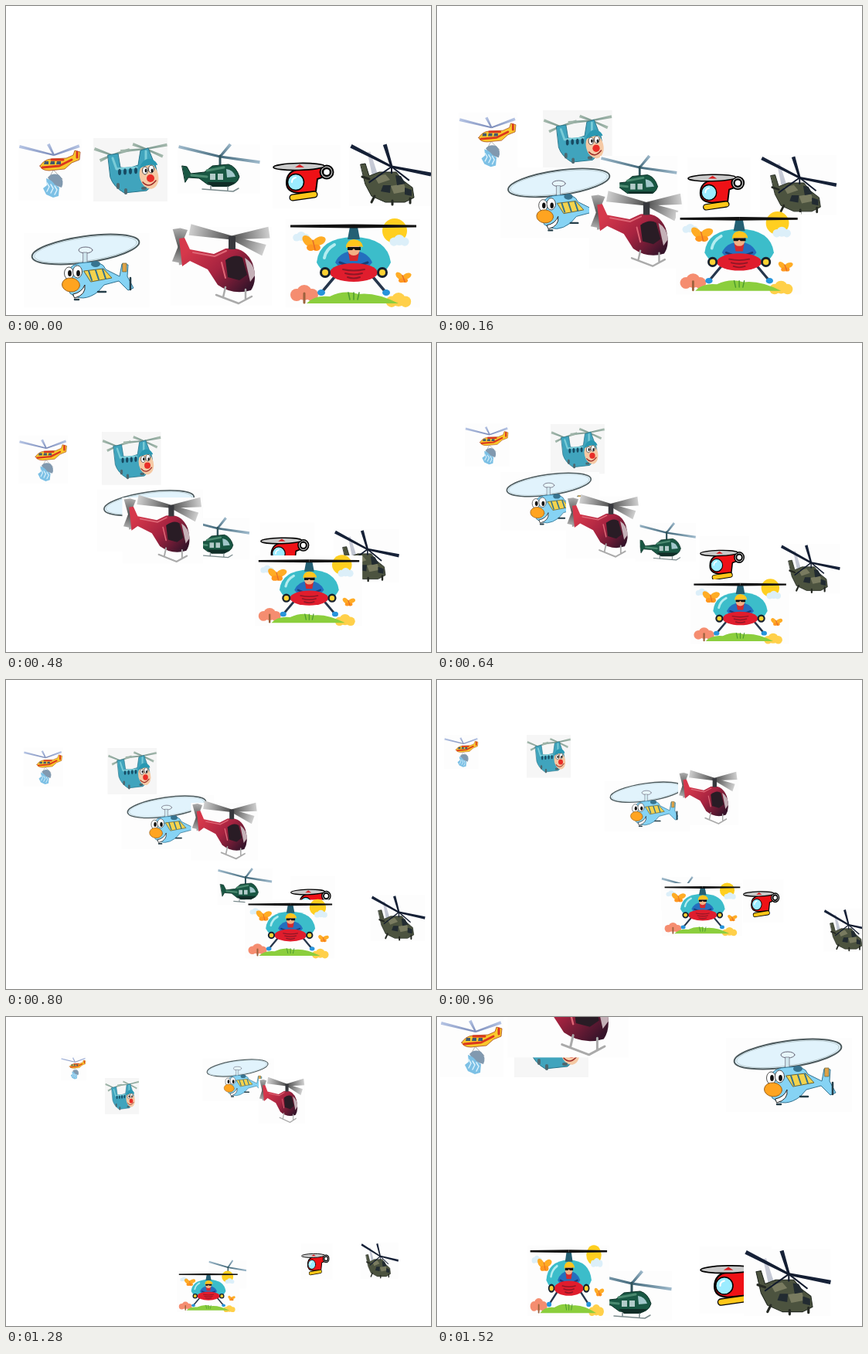
Write an HTML page with a canvas that moves like this. It is 550 px wide and 400 px high and loops after 1600 ms.

```html
<!DOCTYPE html>
<html lang="en">
<head>
<meta charset="utf-8">
<title>Helicopters</title>
<style>
html, body { margin: 0; width: 100%; height: 100%; overflow: hidden; background: #fff }
canvas { display: block }
</style>
</head>
<body>
<canvas id="stage" width="550" height="400"></canvas>
<script>
const ctx = document.getElementById('stage').getContext('2d');
const FRAME = 80, LOOP = 1600, SHRINK_END = 1280;
const times = [0, 160, 320, 640, 960, SHRINK_END, 1520];

function paint(path, fill, stroke, width = 1) {
  if (fill) {
    ctx.fillStyle = fill;
    ctx.fill(path);
  }
  if (stroke) {
    ctx.strokeStyle = stroke;
    ctx.lineWidth = width;
    ctx.stroke(path);
  }
}

const shape = (d, ...style) => paint(new Path2D(d), ...style);
const line = (d, color, width) => shape(d, null, color, width);

function oval(x, y, rx, ry, tilt, ...style) {
  const path = new Path2D();
  path.ellipse(x, y, rx, ry, tilt, 0, 7);
  paint(path, ...style);
}
const disc = (x, y, r, ...style) => oval(x, y, r, r, 0, ...style);

// Blades leave the hub at an angle in degrees and widen from root to tip.
function rotor(x, y, color, tipColor, root, tip, ...blades) {
  for (const [angle, length] of blades) {
    const fade = ctx.createLinearGradient(0, 0, length, 0);
    fade.addColorStop(0, color);
    fade.addColorStop(1, tipColor);
    ctx.save();
    ctx.translate(x, y);
    ctx.rotate(angle * Math.PI / 180);
    shape(`M0 ${-root / 2}L${length} ${-tip / 2}V${tip / 2}L0 ${root / 2}z`, fade);
    ctx.restore();
  }
}

function eyes(x, y, gap, rx, ry) {
  for (const side of [-1, 1]) {
    oval(x + side * gap, y - side, rx, ry, 0, '#fff', '#222', .8);
    oval(x + side * gap + 1, y + 1, rx * .4, ry * .5, 0, '#111');
  }
}

function rescue() {
  rotor(62, 193, '#7889b8', '#b5c4e4', 2, 4, [194, 46], [-20, 35], [243, 16]);
  shape('M44 207Q49 199 58 198L78 197 87 193 89 187 96 189 95 199 85 203 76 211 56 213Q46 213 44 207z', '#f9c82c', '#a8481d', .8);
  line('M47 209L69 207 85 199M59 199H74M92 189V196', '#db371e', 3);
  for (let i = 0; i < 3; i++) shape(`M${50 + i * 8} 201h5v4h-6z`, '#42596d');
  line('M61 213L56 222M62 213L73 224', '#888', .7);
  shape('M54 222Q60 215 69 219 76 226 72 235L60 231z', '#8199af');
  shape('M52 223Q59 225 63 231L69 235 68 246 61 248 52 244 48 236 53 232z', '#7cc0e5');
  for (let i = 0; i < 3; i++) line(`M${53 + i * 5} ${229 + i * 2}l3 5-3 6`, '#d8f0fb', 1.5);
}

function tandem() {
  rotor(137, 193, '#77968d', '#a5b9ad', 2, 4, [200, 24], [-17, 24], [155, 17]);
  rotor(181, 185, '#77968d', '#a5b9ad', 2, 4, [175, 33], [-11, 28], [200, 18], [24, 24]);
  shape('M132 193L145 191 148 209Q158 211 171 206L174 187 184 184 190 199Q198 211 193 229L182 239 153 242Q139 234 135 222z', '#40a4bd', '#28758b');
  line('M138 197L143 211 169 209M181 188V200', '#7accd8', 3);
  for (let i = 0; i < 4; i++) oval(147 + i * 7, 215 - i * .6, 2, 4, 0, '#174b63');
  oval(185, 220, 12, 17, -.25, '#f5c9a4');
  shape('M172 211Q177 196 188 198 195 201 196 206 184 204 172 211z', '#2998b2');
  eyes(184, 212, 4, 3.5, 5);
  disc(187, 223, 5, '#e92d27');
  line('M177 228Q185 237 194 226', '#9b2925', 1.5);
  line('M155 238v4M145 231v4M177 236h3', '#4d6870', 4);
}

function green() {
  rotor(277, 195, '#416779', '#9fbacc', 3, 4, [193.5, 55], [-50, 21], [8, 52]);
  line('M277 194V207', '#31545c', 3);
  shape('M228 207L234 208 239 217 257 215 267 207 288 205Q298 208 302 221 299 232 285 233L261 231 250 223 236 222 232 228z', '#195743', '#0d3027');
  line('M260 213L282 209M240 219L260 221', '#4b8a70', 3);
  shape('M285 211Q294 212 297 221L286 222z', '#a1c7ca');
  for (let i = 0; i < 2; i++) shape(`M${264 + i * 10} 217h7v8h-7z`, '#b2cbc9');
  shape('M260 228H297L288 234H267z', '#102d27');
  line('M254 237L294 240 301 236M265 233v5M287 234v5', '#7b8b8d', 1.5);
}

function toy() {
  shape('M363 229Q363 214 379 211L410 206 414 220 403 224 401 240 379 242Q363 241 363 229z', '#ef1116', '#000', 2);
  disc(375, 228, 10.5, '#9cecff', '#000', 1.5);
  line('M370 228Q370 223 375 222', '#fff', 2);
  disc(415, 215, 8.5, '#ccc', '#000', 2);
  disc(415, 215, 5, '#fff', '#000', 2.5);
  line('M371 248L399 244', '#000', 9);
  line('M371 248L399 244', '#ffc719', 6.5);
  oval(379, 208, 33, 4.5, -.02, '#cacaca', '#000', 1.7);
  shape('M374 209L380 205 386 209z', '#d92024');
}

function gunship() {
  rotor(477, 217, '#bfc5d1', '#d0d0dc', 7, 4, [255, 29]);
  shape('M459 205L465 204 470 220 483 215 505 215 514 226 526 235 528 248 516 254 491 254 473 246 465 231z', '#4c533f', '#20271f');
  shape('M477 221L491 218 497 225 482 230zM498 233L515 230 518 240 502 243z', '#797b60');
  shape('M504 219L511 220 517 230 506 232zM488 232L498 232 497 242 485 240zM516 235L525 238 525 246 516 244z', '#222b31');
  line('M477 246L473 254M500 252V257M523 249V255M461 221L470 224', '#252923', 3);
  rotor(499, 208, '#111a2d', '#111a2d', 2, 2, [145, 36], [38, 29], [90, 9]);
  rotor(499, 208, '#111a2d', '#17233a', 3, 5, [207, 59], [253, 30], [11, 52]);
}

function cartoon() {
  oval(103, 315, 70, 17, -.14, '#e1f3fc', '#4d5a5d', 2);
  oval(103, 315, 67, 15, -.14, null, '#b9cbd0', 1);
  oval(103, 316, 9, 4, 0, '#e7f6fb', '#667', 1);
  shape('M100 319H105V336H100z', '#d0e7ee', '#667', .7);
  shape('M77 347Q84 332 103 332 125 329 129 341L147 350 150 334 158 335 157 350 165 365 158 368 146 356 127 361 119 370Q99 385 83 372z', '#86d3f4', '#31718f');
  shape('M101 343L126 340 137 352 110 357z', '#f4d34d', '#6b6332');
  for (let i = 0; i < 3; i++) line(`M${107 + i * 9} ${343 - i}l4 12`, '#31718f', 2);
  oval(116, 334, 6, 4, 0, '#37738f');
  shape('M151 333H156V344H151z', '#dfa348', '#6b6332', .7);
  eyes(87, 345, 5.5, 6, 8);
  shape('M87 373Q98 371 102 361 104 374 89 378z', '#fff', '#222');
  oval(84, 361, 11.5, 9, .1, '#ffa420', '#9b621e');
  line('M89 380h5M119 370h10M161 352v15', '#253e49', 2.5);
}

function maroon() {
  rotor(224, 312, '#555', '#aaa', 3, 10, [78, 23], [262, 24], [102, 20], [285, 24]);
  const body = ctx.createLinearGradient(245, 305, 310, 370);
  ['#d6384b', '#a62340', '#35142a'].forEach((color, i) => body.addColorStop(i / 2, color));
  shape('M224 301L231 300 238 315 269 321 284 314Q309 310 319 333 326 355 317 368 294 375 274 361L261 341 238 330 228 337z', body);
  shape('M284 329Q297 320 306 326L312 348 302 355 287 351z', '#291c25');
  shape('M309 326Q322 334 322 349L316 357z', '#c5b1b8');
  line('M242 319L270 324 285 317M279 332L284 352', '#df6676', 2);
  rotor(292, 300, '#4c4c4c', '#cfcfcf', 5, 15, [191, 55], [-8, 49], [21, 45]);
  shape('M288 298H297V315H288z', '#37383d');
  line('M272 374L301 385 318 376M284 364L281 377M310 367V380', '#aaa', 2.5);
}

function butterfly(x, y, size) {
  for (const side of [-1, 1]) {
    oval(x + side * size * .6, y - size * .3, size * .75, size * .45, side * -.6 + .2, '#ffac25');
    oval(x + side * size * .3, y + size * .4, size * .45, size * .35, 0, '#ff971f');
  }
  line(`M${x - 1} ${y - size * .4}l3 ${size}`, '#e36b2a', 1.5);
}

function puffs(x, y, r, color) {
  for (let i = -1; i < 2; i++) disc(x + i * r, y + Math.abs(i) * r * .3, r * (1 - Math.abs(i) * .2), color);
}

function pilot() {
  disc(503, 291, 16, '#ffcf20');
  puffs(509, 303, 7, '#dceff9');
  puffs(382, 298, 6, '#dceff9');
  butterfly(398, 308, 12);
  butterfly(514, 352, 8);
  puffs(386, 371, 10, '#f58d70');
  line('M386 372V384', '#9c613d', 3);
  puffs(508, 380, 9, '#ffd04a');
  shape('M389 385Q399 374 419 376 438 367 456 373 478 370 508 385z', '#8bce3d');
  for (let i = -1; i < 2; i++) line(`M${450 + i * 7} 371l${-i * 2} 9`, '#4b992f', 1.5);
  for (const side of [-1, 1]) {
    line(`M${450 + side * 25} 351L${450 + side * 41} 370`, '#26364c', 3.5);
    oval(450 + side * 42, 371, 5, 4, 0, '#2794dc');
  }
  shape('M402 332Q405 300 450 299 494 300 498 332 490 349 473 350H427Q410 348 402 332z', '#3cbdca');
  line('M412 326Q414 315 425 309', '#b4edf0', 4);
  shape('M445 286H455L458 302H442z', '#246074');
  shape('M426 332Q432 318 450 317 468 318 474 332L466 341H434z', '#246fbe');
  line('M432 332L445 337M468 332L455 337', '#173d78', 3);
  shape('M443 319L457 319 455 330H445z', '#d5292d');
  disc(450, 315, 8, '#f3b184');
  shape('M440 313Q440 303 450 302 461 303 462 312 450 309 440 313z', '#ffc51c');
  shape('M442 312H459V316H452L450 314 448 316H442z', '#111');
  oval(450, 345, 31, 12, 0, '#e01d2d');
  for (let i = 0; i < 3; i++) line(`M${436 + i * 3} ${341 + i * 5}Q450 ${344 + i * 5} ${464 - i * 3} ${341 + i * 5}`, '#8f1726', 2);
  for (const side of [-1, 1]) disc(450 + side * 37, 345, 5.5, '#ffd233', '#17212d', 3);
  rotor(450, 285, '#111', '#111', 5, 3, [0, 81], [180, 82]);
}

// draw uses the coordinates of the first pose; path lists the card's corner at each time
const fleet = [
  { draw: rescue, size: [82, 80], small: [.4, .4],
    path: [[16, 172], [28, 138], [-3, 136], [36, 104], [9, 71], [71, 50], [4, -2]] },
  { draw: tandem, size: [96, 82], card: '#f6f6f6',
    path: [[113, 171], [137, 135], [101, 125], [147, 105], [116, 71], [128, 79], [100, -4]] },
  { draw: green, size: [107, 64],
    path: [[222, 179], [211, 194], [203, 220], [257, 233], [290, 255], [262, 315], [197, 329]] },
  { draw: toy, size: [88, 82], last: [1.06, 1.06],
    path: [[345, 180], [324, 196], [318, 215], [340, 250], [396, 258], [382, 293], [340, 297]] },
  { draw: gunship, size: [106, 82], last: [1.06, 1.06],
    path: [[444, 177], [418, 193], [404, 222], [444, 260], [500, 296], [459, 292], [397, 300]] },
  { draw: cartoon, size: [163, 96], small: [.57, .57],
    path: [[23, 294], [82, 209], [154, 212], [82, 167], [217, 131], [254, 54], [374, 27]] },
  { draw: maroon, size: [131, 102], last: [1.2, 1.2],
    path: [[213, 286], [197, 243], [134, 201], [167, 199], [312, 119], [327, 80], [91, -70]] },
  { draw: pilot, size: [174, 114], small: [.466, .466], last: [.61, .8],
    path: [[362, 276], [309, 267], [316, 244], [328, 306], [291, 263], [221, 329], [117, 296]] }
];

const mix = (a, b, k) => a.map((v, i) => v + (b[i] - v) * k);

function drawFleet(elapsed) {
  const t = Math.floor(elapsed % LOOP / FRAME) * FRAME;
  const next = Math.max(1, times.findIndex(time => time >= t));
  const k = (t - times[next - 1]) / (times[next] - times[next - 1]);
  ctx.clearRect(0, 0, 550, 400);
  ctx.lineCap = ctx.lineJoin = 'round';
  for (const { draw, path, size, card = '#fdfdfd', small = [.46, .57], last = [1, 1] } of fleet) {
    const [x, y] = path[0];
    const scale = t <= SHRINK_END ? mix([1, 1], small, t / SHRINK_END) : mix(small, last, k);
    ctx.save();
    ctx.translate(...mix(path[next - 1], path[next], k));
    ctx.scale(...scale);
    ctx.translate(-x, -y);
    ctx.fillStyle = card;
    ctx.fillRect(x, y, ...size);
    draw();
    ctx.restore();
  }
}

const start = performance.now();
function tick() {
  drawFleet(performance.now() - start);
  requestAnimationFrame(tick);
}
tick();
</script>
</body>
</html>
```
